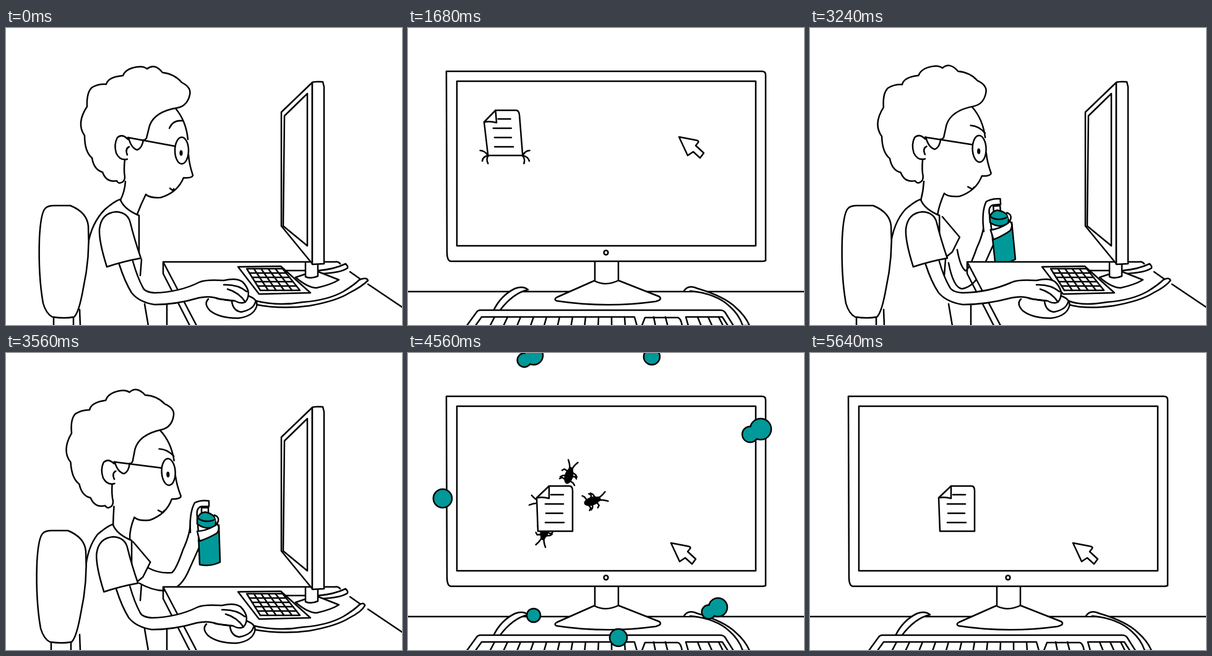
Recreate the animation shown at these times as an HTML page with a canvas. Size 640 px wide and 480 px high, loop 5680 ms.

```html
<!DOCTYPE html>
<html lang="en">
<head>
<meta charset="utf-8">
<title>Debugging</title>
<style>
html, body { margin: 0; width: 100%; height: 100%; overflow: hidden; background: #fff; }
canvas { display: block; }
</style>
</head>
<body>
<canvas id="stage" width="640" height="480"></canvas>
<script>
const LOOP = 5680, STEP = 40;
const TEAL = '#009999', BLACK = '#000', WHITE = '#fff';
const c = document.getElementById('stage').getContext('2d');

const mix = (a, b, k) => a + (b - a) * k;
const span = (t, a, b) => Math.max(0, Math.min(1, (t - a) / (b - a)));
const ease = (t, a, b) => { const k = span(t, a, b); return k * k * (3 - 2 * k); };
const rad = deg => deg * Math.PI / 180;
const range = n => [...Array(n).keys()];

function ink(d, fill, width = 2.5) {
  const p = new Path2D(d);
  if (fill) { c.fillStyle = fill; c.fill(p); }
  c.lineWidth = width;
  c.stroke(p);
}

function oval(x, y, rx, ry, fill, line = true) {
  c.beginPath();
  c.ellipse(x, y, rx, ry, 0, 0, 7);
  if (fill) { c.fillStyle = fill; c.fill(); }
  if (line) { c.lineWidth = 2.5; c.stroke(); }
}

// Draws moved by x, y and turned in degrees about px, py.
function placed(x, y, draw, turn = 0, px = 0, py = 0) {
  c.save();
  c.translate(x + px, y + py);
  c.rotate(rad(turn));
  c.translate(-px, -py);
  draw();
  c.restore();
}

// Merged circles that share one outline; extra is an optional joined shape.
function puff(list, extra) {
  const dots = (grow, color) => list.forEach(([x, y, r]) => {
    if (r > 1.5) oval(x, y, r + grow, r + grow, color, false);
  });
  dots(1.3, BLACK);
  if (extra) ink(extra, null, 4);
  dots(-1.2, TEAL);
  if (extra) { c.fillStyle = TEAL; c.fill(new Path2D(extra)); }
}

/* ---------- side view ---------- */

const HAIR = 'M192 213Q190 230 192 240Q192 247 188 249Q182 253 179 247Q162 250 156 233Q142 229 139 210' +
  'Q127 200 127 174Q113 154 131 127Q130 104 139 96Q150 90 162 91Q165 79 189 77Q193 66 211 63Q222 61 228 66' +
  'Q240 56 253 72Q272 74 284 88Q300 96 297 108Q293 126 277 129Q240 135 232 158Q229 170 227 178Q224 182 222 181';

function head(angry) {
  ink(HAIR);
  ink('M198 177Q202 194 212 197Q220 194 222 181');
  ink('M197 180Q188 170 180 177Q174 188 178 202Q184 215 196 212M199 192Q192 195 196 205');
  ink('M197 177L273 191');
  oval(284, 198, 11, 21.5);
  oval(283, 202, 2.6, 4.6, BLACK, false);
  ink('M274 130Q291 150 294 180M295 205Q296 220 302 238Q301 243 287 242Q277 266 250 274Q232 275 226 269');
  ink(angry ? 'M271 160Q284 161 294 173' : 'M264 162Q270 148 286 150');
  ink(angry ? 'M264 259L271 263L274 260' : 'M265 259L270 263L271 260');
}

// The neck and back tie the moving head to the torso.
function torso(lean) {
  const n = lean * .68, h = lean * 1.06;
  ink(`M${193 + h} 248Q${192 + h} 264 ${185 + n} 278M${226 + h} ${269 + lean * .2}Q${218 + h} 285 ${212 + n} 301`);
  ink(`M${185 + n} 277Q${178 + n} 278 ${160 + n} 293Q${138 + n * .6} 315 ${132 + n * .3} 352`);
  placed(n, 0, () => ink('M185 278Q191 293 215 303V365'));
  ink('M219 374L217 400M224 446L230 481M260 440V481M119 455L120 481');
}

function desk() {
  ink('M254 378H535L640 451V490H313Z', WHITE, .01);
  ink('M254 378H532Q537 377 540 381M254 378V397L297 481M254 378L308 481M585 414L640 451M556 394L573 406');
  ink('M447 392H484M505 392Q530 390 549 381L552 385V388Q540 396 508 397');
  ink('M375 386L444 385L492 428L409 430Z', WHITE);
  const grid = (u, v) => mix(mix(389, 447, u), mix(411, 475, u), v) + ' ' + mix(389, 424, v);
  range(6).forEach(i => ink(`M${grid(i / 5, 0)}L${grid(i / 5, 1)}M${grid(0, i / 5)}L${grid(1, i / 5)}`));
}

function monitorSide() {
  ink('M486 397L468 403Q488 420 502 420Q525 415 538 407L505 394', WHITE);
  ink('M484 380V402Q493 406 504 401V380', WHITE);
  ink('M495 88L445 136V320L495 381Z', WHITE);
  ink('M487 106L450 142L448 320L487 352Z');
  ink('M495 88Q498 86 512 87L514 95V381L495 382Z', WHITE);
}

function cable(m, lean) {
  const x = 404 + m, e = 585 + lean * .28;
  ink(`M${x} 441Q440 450 480 443Q520 440 545 426Q563 415 571 407Q${e - 2} 402 ${e} 408` +
    `Q575 418 555 428Q535 441 490 449Q445 455 ${x} 447`, WHITE);
}

function mouseArm(b, m) {
  const p = (x, y, k = 1) => `${x + mix(b, m, k)} ${y}`;
  placed(m, 0, () => {
    ink('M327 438Q319 446 330 457Q345 469 375 469Q400 466 405 450Q408 439 392 433', WHITE);
    ink('M365 442Q367 457 380 459Q400 455 403 443');
  });
  ink(`M${p(183, 382, 0)}Q${p(192, 410, 0)} ${p(203, 428, .1)}Q${p(215, 443, .2)} ${p(240, 447, .3)}` +
    `Q${p(275, 447, .6)} ${p(312, 436)}Q${p(330, 432)} ${p(345, 438)}L${p(370, 441)}` +
    `Q${p(385, 449)} ${p(390, 438)}Q${p(396, 424)} ${p(382, 410)}Q${p(372, 403)} ${p(352, 408)}` +
    `Q${p(322, 406)} ${p(312, 411)}Q${p(280, 427, .6)} ${p(240, 428, .3)}` +
    `Q${p(224, 427, .2)} ${p(221, 419, .1)}Q${p(212, 402, 0)} ${p(205, 377, 0)}`, WHITE);
  placed(m, 0, () => ink('M352 415Q375 414 389 426M358 422Q376 427 387 443M340 437Q355 440 368 441'));
  placed(b, 0, () => ink('M163 386Q150 345 151 325Q154 299 178 297Q197 298 201 315Q207 340 218 372Q190 377 163 386Z', WHITE));
}

function canArm(b, drop) {
  const x = -drop * .44, y = drop;
  ink(`M${234 + b} ${347 + y * .3}Q${248 + x * .3} ${357 + y * .8} ${268 + x} ${355 + y}` +
    `Q${275 + x} ${350 + y} ${286 + x} ${318 + y}Q${299 + x} ${290 + y} ${298 + x} ${270 + y}` +
    `L${314 + x} ${310 + y}L${296 + x} ${350 + y}Q${283 + x} ${381 + y} ${262 + x} ${384 + y}` +
    `Q${240 + x * .5} ${386 + y * .9} ${220 + b} ${372 + y * .2}`, WHITE);
  placed(x, y, () => {
    ink('M298 290Q296 258 305 242Q315 237 328 239V248H316Q307 250 309 264L312 305', WHITE);
    ink('M316 250H327V259H316Z', WHITE);
    ink('M311 292Q330 290 344 278L346 338Q330 346 313 342Z', TEAL);
    ink('M309 268Q312 258 322 257Q336 260 340 270L338 280Q322 287 309 276Z', TEAL);
    ink('M309 266Q322 277 340 268');
    ink('M337 262Q347 266 341 276Q347 282 341 291Q330 298 313 304L309 288Q322 288 338 279L341 276', WHITE);
  }, -y * .1, 320, 300);
  placed(b, 0, () => ink('M210 305L238 338L226 362L215 371', WHITE));
}

// Rows of puffs up the screen: one on each edge and a wide one between.
const CLOUD = range(8).flatMap(i => {
  const bulge = Math.min(1, 1.5 * Math.sin(Math.PI * (i + .5) / 8)), y = 97 + i * 35;
  return [[470 - 25 * bulge, y + 5, 17], [470, y, 28 * bulge + 4], [470 + 21 * bulge, y, 19]];
});
const DROPS = [[413, 147], [498, 77], [520, 160], [529, 305], [428, 353]];

function spray(t) {
  const reach = span(t, 3560, 3680), k = span(t, 3640, 4040), s = Math.sqrt(k);
  if (!reach) return;
  const x = mix(328, 447, reach);
  const cone = `M328 251Q${mix(328, 395, reach)} ${251 - 6 * reach} ${x} ${251 - 56 * reach}` +
    `V${251 + 24 * reach}Q${mix(328, 415, reach)} 252 328 251Z`;
  puff(CLOUD.map(([a, b, r]) => [mix(468, a, s), mix(225, b, s), r * s]), cone);
  const far = mix(.6, 1, k);
  if (k > .3) puff(DROPS.map(([a, b]) => [mix(470, a, far), mix(220, b, far), 5]));
}

function side(t) {
  const late = t > 2000;
  const lean = late ? -7 - 1.5 * ease(t, 2960, 3240) - 9 * ease(t, 3240, 3560) : -1.5 * ease(t, 0, 640);
  const m = late ? 14 - 17 * ease(t, 3240, 3560) : 6 - 6 * Math.cos(t / 60);
  const b = m * .4 + lean * .2;
  torso(lean);
  if (late) canArm(b, 150 * (1 - span(t, 2960, 3520)) ** 2);
  desk();
  monitorSide();
  cable(m, lean);
  mouseArm(b, m);
  placed(lean * .23, 0, () => {
    ink('M75 467Q65 462 60 445Q52 400 54 340Q56 300 63 292Q67 287 78 287H104Q131 298 133 320Q136 370 125 420Q118 460 110 467Q95 470 75 467Z', WHITE);
    ink('M77 468V481M109 468V481');
  });
  placed(lean, lean * .2, () => head(late), lean * .175, 240, 270);
  if (late) spray(t);
}

/* ---------- front view ---------- */

function keys(first, gap, count) {
  range(count).forEach(i => {
    const x = first + i * gap;
    ink(`M${x} 467L${x + (x - 325) * .04} 481`);
  });
}

function screen() {
  ink('M0 426H640');
  ink('M138 457Q150 432 173 421Q186 416 194 423Q170 428 148 457', WHITE);
  ink('M446 425Q453 414 468 421Q512 434 530 452Q545 465 552 481H541Q535 463 520 450Q498 429 456 425', WHITE);
  ink('M302 408L241 435Q235 438 240 441Q320 453 400 442Q412 439 406 434L340 408', WHITE);
  ink('M302 378V409Q320 418 340 408V378', WHITE);
  ink('M62 70H572Q578 70 578 76V376L574 377H69Q63 376 63 362Z', WHITE);
  ink('M79 86H562V352H79Z');
  oval(320, 363, 3.4, 3.6);
  ink('M95 481L111 459Q113 456 117 456H505Q511 456 514 462L526 481', WHITE);
  ink('M109 481L119 467H366L370 481M378 481L383 468H436Q441 469 443 481M453 481L449 467H508L517 481');
  keys(140, 21, 11);
  keys(397, 19, 2);
  keys(468, 17, 3);
}

function cursor(x, y) {
  placed(x, y, () => ink('M0 0L26 5Q33 6 31 9L27 14L40 26L34 34L23 24L14 30Z', WHITE));
}

function legs(size, swing) {
  [-1, 1].forEach(s => {
    c.save();
    c.translate(s < 0 ? 2 : 58, 73);
    c.scale(s * size, size);
    ink(`M0 0Q5 -${8 + swing} 12 ${-8 + swing}M0 0Q9 2 10 ${9 - swing}M0 1Q4 6 ${1 + swing} 13`, null, 2.5 / Math.max(size, .5));
    c.restore();
  });
}

function page(x, y, skew, size, swing) {
  c.save();
  c.transform(1, 0, skew, 1, x - skew * 19, y);
  ink('M0 19L20 0H53Q58 0 58 8V73H2Z', WHITE);
  ink('M0 19Q10 17 20 20V0M23 14H43M14 29H43M15 44H42M14 59H44');
  if (size > 0) legs(size, swing);
  c.restore();
}

// The page flees up left, then down; the cursor comes near, overshoots and circles back.
function chase(t) {
  const near = ease(t, 720, 960), flee = ease(t, 1080, 1680), back = ease(t, 1760, 2120);
  const hop = Math.sin(Math.PI * flee);
  screen();
  page(287 - 164 * flee + 85 * back, 177 - 44 * flee + 82 * back - 20 * hop, .08,
    ease(t, 880, 1120), t > 1080 && t / STEP % 2 ? 3 : 0);
  cursor(440 - 66 * near + 64 * flee - 13 * back + 40 * hop, 320 - 76 * near - 68 * flee + 131 * back);
}

function bug(x, y, angle, kick) {
  placed(x, y, () => {
    oval(-1, 0, 13, 7, BLACK, false);
    oval(10, 0, 4, 4, BLACK, false);
    [-1, 1].forEach(s => {
      [-8, -1, 6].forEach((a, i) => {
        const k = (i % 2 ? kick : -kick) * s;
        ink(`M${a} ${s * 4}L${a + k} ${s * 10}L${a - 3 + k} ${s * 13}`);
      });
      ink(`M11 ${s * 2}Q17 ${s * 3} 24 ${s * 8}`);
    });
  }, angle);
}

const HEADINGS = [-10, -66, 113, 202, 150, 55, -9, 10];

// Bugs leave from behind the page at growing intervals.
function bugs(t) {
  c.save();
  c.beginPath();
  c.rect(80, 87, 481, 264);
  c.clip();
  HEADINGS.forEach((dir, i) => {
    const d = (t - 4436 - 10 * i * i) * .5, a = rad(dir);
    if (d > 0) bug(237 + d * Math.cos(a), 250 + d * Math.sin(a), dir - 8, (t / STEP + i) % 2 ? 2 : -2);
  });
  c.restore();
}

// Every other blob has a smaller lobe at its lower left.
const BLOBS = [[394, 6, 13], [203, 4, 15], [56, 235, 15], [570, 123, 17], [203, 424, 11], [501, 411, 15], [340, 460, 14]]
  .flatMap(([x, y, r], i) => i % 2 ? [[x, y, r], [x - r, y + r * .5, r * .75]] : [[x, y, r]]);

function mist(t) {
  if (t >= 4720) return;
  const k = span(t, 4080, 4560), u = 1 - (1 - k) ** 2, gone = span(t, 4560, 4720);
  const out = .5 + .5 * u + .04 * gone, core = Math.max(0, 1 - k * 2.4);
  const ring = BLOBS.map(([x, y, r]) => [mix(315, x, out), mix(245, y, out), (r + 95 * (1 - u)) * (1 - gone)]);
  puff([...ring, ...range(3).map(i => [250 + 70 * i, 242, 130 * core])]);
}

function cleanup(t) {
  screen();
  bugs(t);
  page(208, 215, 0, 0, 0);
  cursor(425, 307);
  mist(t);
}

/* ---------- face ---------- */

function face(t) {
  const k = span(t, 2560, 2760), wide = 1 - span(t, 2160, 2400);
  ink('M46 481Q70 445 200 432L270 422M370 422L440 432Q570 445 595 481M270 400V424Q320 456 370 424V400');
  placed(0, 5 * k, () => {
    ink('M218 190Q206 290 240 350Q275 408 320 410Q365 408 400 350Q434 290 422 190', WHITE);
    ink('M215 222Q190 208 190 242Q194 280 219 276M425 222Q450 208 450 242Q446 280 421 276');
    ink('M218 200Q182 208 184 170Q160 148 184 120Q178 80 212 74Q218 36 256 42Q276 2 316 20Q352 0 376 36' +
      'Q418 26 424 70Q466 78 454 118Q478 150 454 172Q456 208 422 200Q414 150 390 138Q350 156 316 134Q280 156 250 138Q226 150 218 200Z', WHITE);
    [-1, 1].forEach(s => {
      const x = 320 + 54 * s;
      oval(x, 240, 42, 40 + 3 * wide);
      oval(x - 4 * wide, 243, 6, 8, BLACK, false);
      ink(`M${x - 30 * s} ${178 + 18 * k}Q${x} ${166 + 10 * k} ${x + 30 * s} ${178 - 8 * k}`, null, 3);
    });
    ink('M308 238Q320 230 332 238M312 262Q300 304 312 308Q322 312 332 306');
    ink(`M290 ${348 + 5 * k}Q320 ${346 - 8 * k} 350 ${348 + 5 * k}`);
  });
}

/* ---------- playback ---------- */

function paint(t) {
  c.fillStyle = WHITE;
  c.fillRect(0, 0, 640, 480);
  c.strokeStyle = BLACK;
  c.lineCap = c.lineJoin = 'round';
  if (t < 720) side(t);
  else if (t < 2160) chase(t);
  else if (t < 2960) face(t);
  else if (t < 4080) side(t);
  else cleanup(t);
}

const start = performance.now();
function frame() {
  const t = (performance.now() - start) % LOOP;
  paint(Math.floor(t / STEP) * STEP);
  requestAnimationFrame(frame);
}
frame();
</script>
</body>
</html>
```
